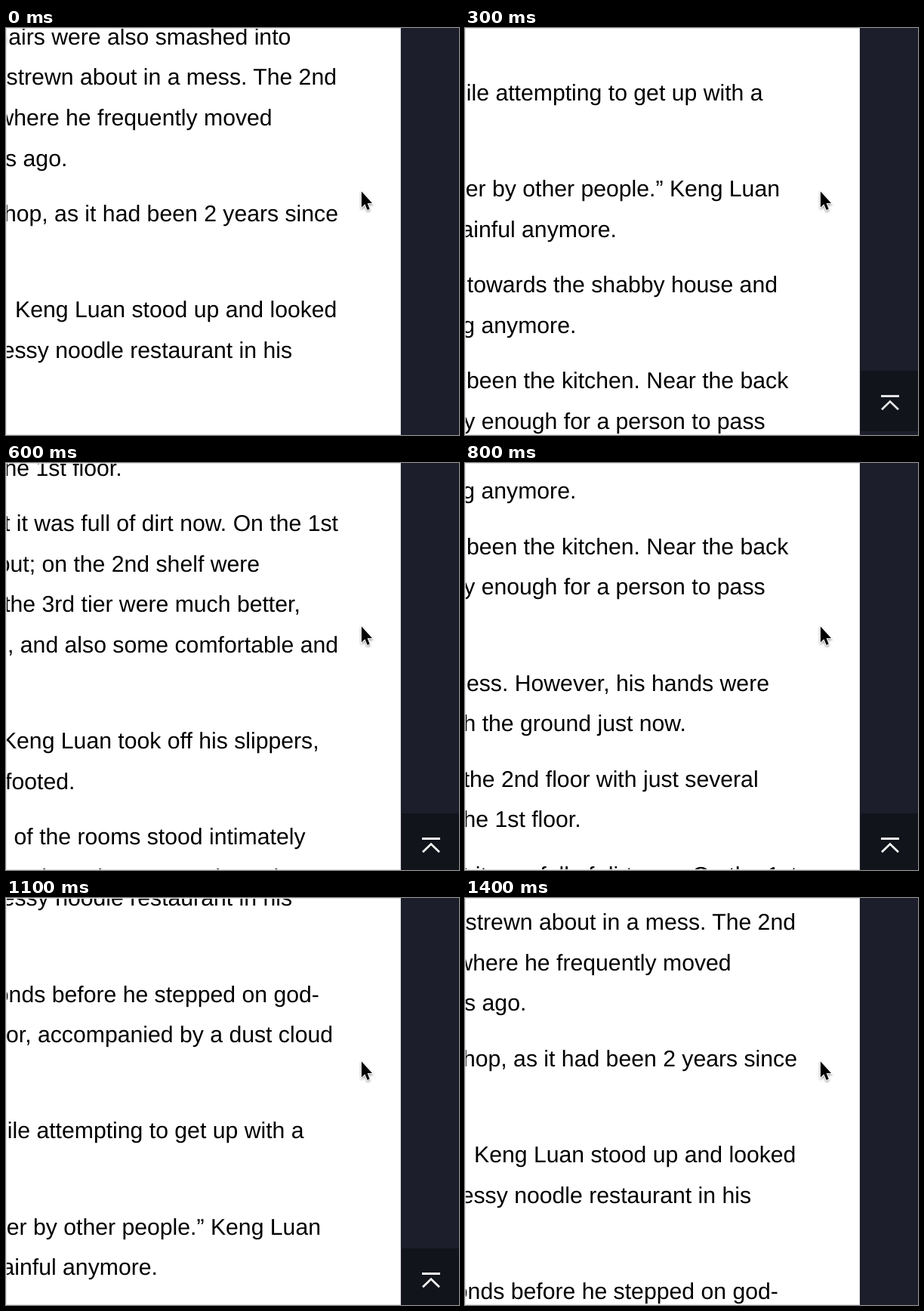
Animation, 600 px wide and 539 px high, one loop 1.5 s. Source, as an HTML page:

```html
<!DOCTYPE html>
<html lang="en">
<head>
<meta charset="utf-8">
<title>Scrolling a chapter</title>
<style>
  html, body { margin: 0; width: 100%; height: 100%; overflow: hidden; background: #1d1e2b; }
  svg { display: block; }
  text {
    font: 30.2px "Liberation Sans", Arial, sans-serif;
    text-anchor: end;
    text-rendering: geometricPrecision;
    fill: #000;
    white-space: pre;
  }
</style>
</head>
<body>
<svg width="600" height="539" viewBox="0 0 600 539">
  <defs>
    <clipPath id="page"><rect width="522" height="539"/></clipPath>
    <filter id="soft" x="-50%" y="-50%" width="200%" height="200%">
      <feDropShadow dx="0" dy="2" stdDeviation="1.5" flood-opacity=".4"/>
    </filter>
  </defs>
  <rect width="600" height="539" fill="#1d1e2b"/>
  <rect width="523" height="539" fill="#fff"/>
  <g clip-path="url(#page)"><g id="story"></g></g>
  <rect x=".5" y=".5" width="522" height="538" fill="none" stroke="#e2e2e4"/>
  <g id="toTop">
    <rect x="524" y="464" width="76" height="80" fill="#12141b"/>
    <path d="M551 497.5H575M552 515.3L563 504.6L574 515.3" fill="none" stroke="#f4f4f4" stroke-width="2.8"/>
  </g>
  <path d="M470.9 216.4V237.4L475.4 233.2L478.7 241L481.7 239.7L478.6 232H485Z"
        fill="#000" stroke="#fff" stroke-width="1.6" paint-order="stroke" filter="url(#soft)"/>
</svg>
<script>
const LOOP = 1500, TICK = 100, LINE = 53.6, GAP = 20;

// Paragraphs of [text, right edge]; null is a line that ends left of the view.
const story = [
  [["chairs were also smashed into", 377.3], ["strewn about in a mess. The 2nd", 438],
   ["where he frequently moved", 352.6], ["years ago.", 81.3]],
  [["shop, as it had been 2 years since", 440], null],
  [[", Keng Luan stood up and looked", 438.4], ["messy noodle restaurant in his", 379], null],
  [["seconds before he stepped on god-", 414.8], ["floor, accompanied by a dust cloud", 433], null],
  [["while attempting to get up with a", 394.5], null],
  [["over by other people.” Keng Luan", 417], ["painful anymore.", 200.9]],
  [["towards the shabby house and", 414], ["living anymore.", 147.3]],
  [["been the kitchen. Near the back", 428.3], ["only enough for a person to pass", 397.6], null],
  [["useless. However, his hands were", 403], ["with the ground just now.", 292.9]],
  [["the 2nd floor with just several", 388.6], ["the 1st floor.", 153.6]],
  [["but it was full of dirt now. On the 1st", 439.9], ["out; on the 2nd shelf were", 336.1],
   ["the 3rd tier were much better,", 389.8], ["the, and also some comfortable and", 440], null],
  [["Keng Luan took off his slippers,", 414.6], ["footed.", 91.4]],
  [["two of the rooms stood intimately", 396.5], ["other and not the rooms where the", 388]]
];

// Scroll path: time, offset, speed per tick.
const path = [
  [0, 0, 0], [300, 649.1, 450], [400, 1173, 400], [600, 1471.4, 0],
  [800, 1005.7, -255], [1100, 426.4, -158], [1400, 33.2, -65], [1500, 0, 0]
];

const page = document.getElementById("story");
const toTop = document.getElementById("toTop");

let y = 21.7;
for (const para of story) {
  for (const line of para) {
    if (line) {
      const el = document.createElementNS("http://www.w3.org/2000/svg", "text");
      el.textContent = line[0];
      el.setAttribute("x", line[1]);
      el.setAttribute("y", y.toFixed(2));
      page.append(el);
    }
    y += LINE;
  }
  y += GAP;
}

function scrollAt(t) {
  const i = path.findIndex(p => p[0] > t);
  const [t0, y0, v0] = path[i - 1], [t1, y1, v1] = path[i];
  const u = (t - t0) / (t1 - t0), n = (t1 - t0) / TICK, w = 1 - u;
  return y0 + (y1 - y0) * u * u * (3 - 2 * u) + n * u * w * (v0 * w - v1 * u);
}

function buttonAt(t) {
  if (t < 300 || t >= 1400) return [0, 0];
  if (t < 400) return [0.92, -10];
  return [t < 1300 ? 1 : 0.5, 0];
}

function draw(now) {
  const t = Math.floor(now % LOOP / TICK) * TICK;
  page.setAttribute("transform", `translate(0 ${-scrollAt(t).toFixed(2)})`);
  const [alpha, shift] = buttonAt(t);
  toTop.setAttribute("opacity", alpha);
  toTop.setAttribute("transform", `translate(0 ${shift})`);
}

let start;
function frame(now) {
  start ??= now;
  draw(Math.max(0, now - start));
  requestAnimationFrame(frame);
}
draw(0);
requestAnimationFrame(frame);
</script>
</body>
</html>
```
